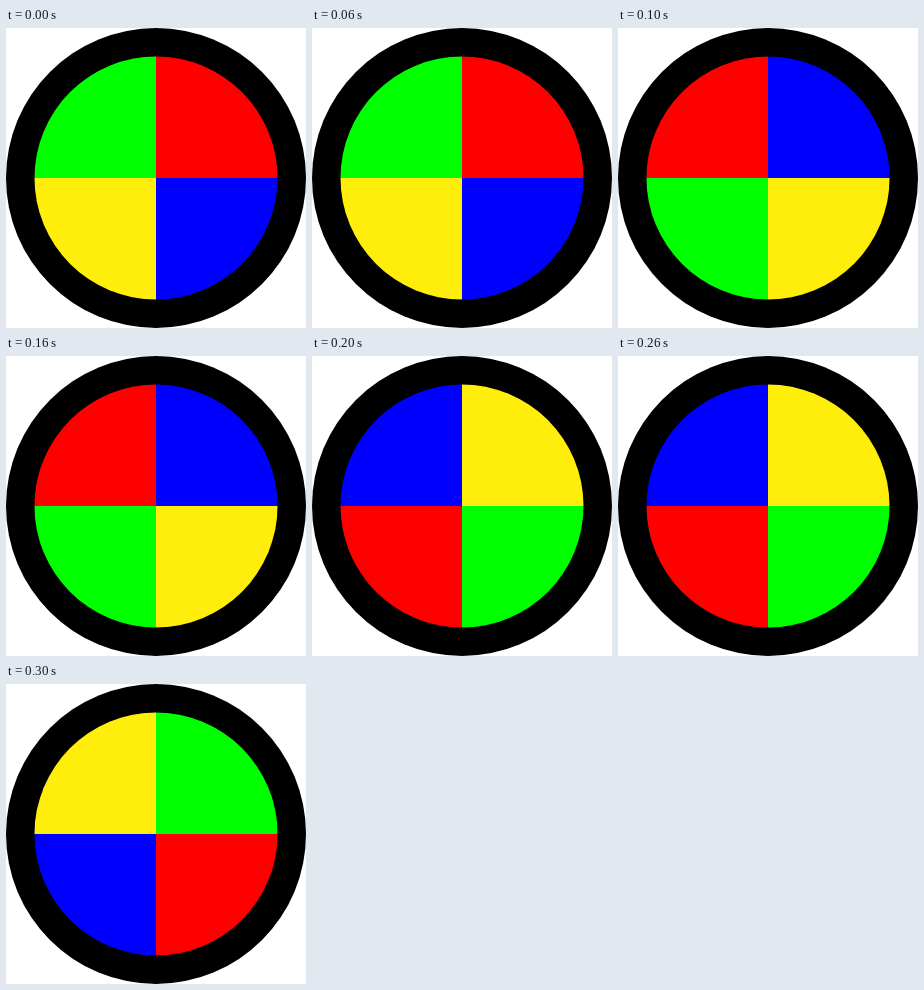
An HTML page that plays this animation: 300x300 px, repeating every 400 ms.

```html
<!DOCTYPE html>
<html lang="en">
<head>
<meta charset="utf-8">
<title>Colour wheel</title>
<style>
  html, body { margin: 0; width: 100%; height: 100%; overflow: hidden; background: #fff; }
  svg { display: block; width: 100%; height: 100%; }
  /* Four hard quarter turns, counter-clockwise */
  #wheel { transform-origin: 0 0; animation: turn 400ms steps(4, end) infinite; }
  @keyframes turn { to { transform: rotate(-360deg); } }
</style>
</head>
<body>
<svg viewBox="-150 -150 300 300">
  <defs>
    <path id="quarter" d="M0 0V-121.5A121.5 121.5 0 0 1 121.5 0Z"/>
  </defs>
  <circle r="150"/>
  <g id="wheel">
    <use href="#quarter" fill="#f00"/>
    <use href="#quarter" fill="#00f" transform="rotate(90)"/>
    <use href="#quarter" fill="#ffed0b" transform="rotate(180)"/>
    <use href="#quarter" fill="#0f0" transform="rotate(270)"/>
  </g>
</svg>
</body>
</html>
```
